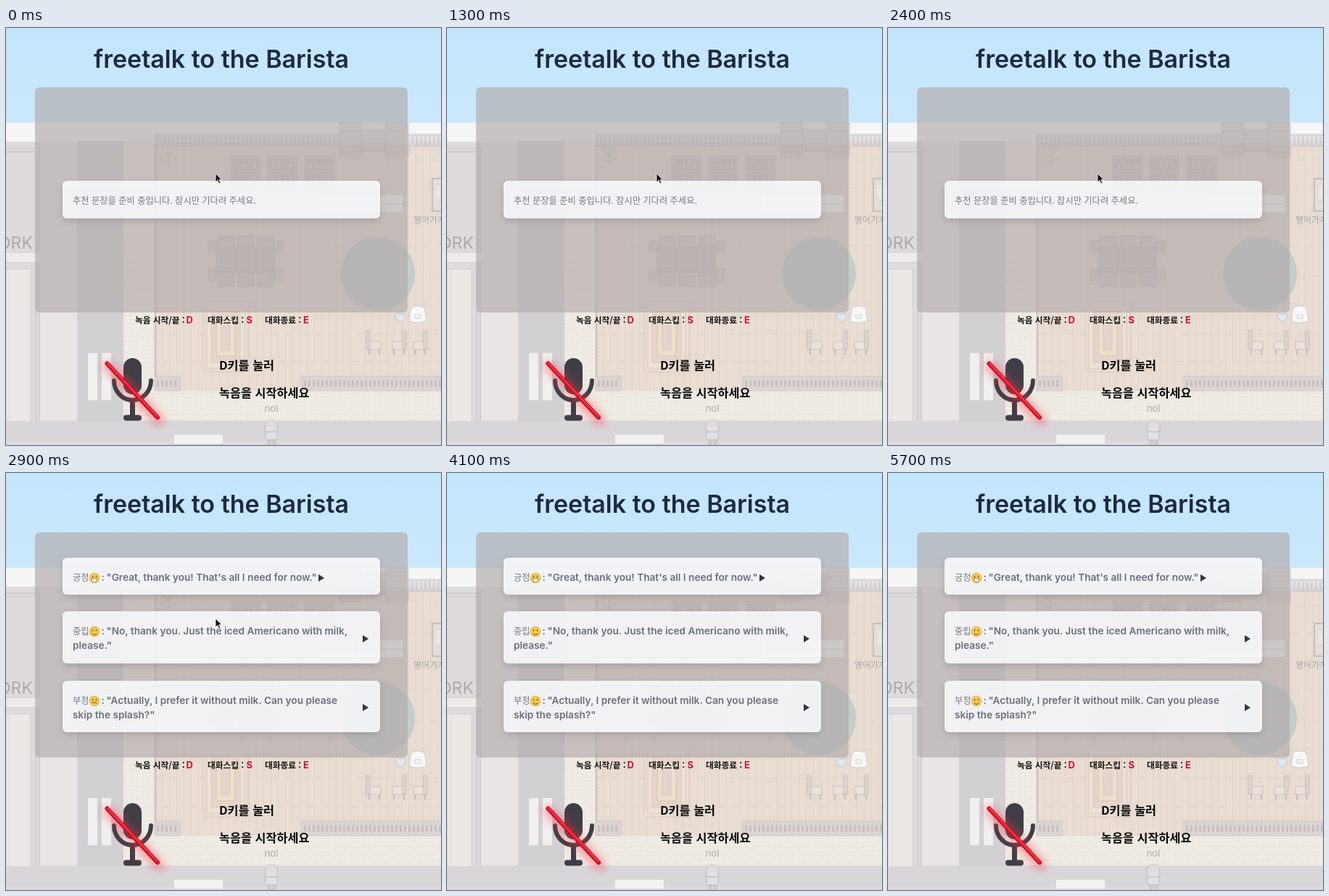
An HTML page that plays this animation: 600x576 px, repeating every 5800 ms.

```html
<!DOCTYPE html>
<html lang="ko">
<head>
<meta charset="utf-8">
<title>Free talk</title>
<style>
html, body { margin: 0; width: 100%; height: 100%; overflow: hidden; background: #eee; }
svg { display: block; width: 600px; height: 576px; }
text { font-family: Inter, "Noto Sans CJK KR", "Noto Sans CJK JP", "Noto Sans CJK", sans-serif; }
.ko { font-family: "Noto Sans CJK KR", "Noto Sans CJK JP", "Noto Sans CJK", sans-serif; }
.title { font-size: 34px; font-weight: 600; fill: #1f2a3d; }
.line { font-size: 13.65px; font-weight: 600; fill: #69707d; }
.soft { font-size: 12.25px; fill: #747982; }
.hint { font-size: 11.7px; font-weight: 700; fill: #111; }
.key { font-size: 13px; fill: #cf1232; }
.guide { font-size: 16.3px; font-weight: 800; fill: #080808; }
.card { fill: #fcfdff; fill-opacity: .85; filter: url(#shade); }
.faint { opacity: .5; }
</style>
</head>
<body>
<svg viewBox="0 0 600 576" xmlns="http://www.w3.org/2000/svg">
  <defs>
    <linearGradient id="sky" x2="0" y2="1">
      <stop stop-color="#c3e5fc"/><stop offset="1" stop-color="#cae8fc"/>
    </linearGradient>
    <linearGradient id="micTone" x2="0" y2="1">
      <stop stop-color="#403d46"/><stop offset="1" stop-color="#453d46"/>
    </linearGradient>
    <pattern id="planks" width="20" height="80" patternUnits="userSpaceOnUse" x="205">
      <rect width="20" height="80" fill="#e8dcd3"/>
      <path d="M.5 0V80M10.5 0V80" stroke="#e2d5cb"/>
      <path d="M0 22h10M10 61h10" stroke="#e0d3c9"/>
    </pattern>
    <pattern id="bricks" width="16" height="12" patternUnits="userSpaceOnUse">
      <rect width="16" height="12" fill="#f0ebe4"/>
      <path d="M0 .5h16M0 6.5h16M4.5 0v6M12.5 6v6" stroke="#ebe5dd"/>
    </pattern>
    <pattern id="rail" width="6" height="18" patternUnits="userSpaceOnUse" x="205" y="146">
      <rect width="6" height="18" fill="#d3d0d2"/>
      <path d="M1.5 4v11" stroke="#aaa7ad" stroke-width="2"/>
      <path d="M0 2h6M0 16.5h6" stroke="#bab7bc" stroke-width="2"/>
    </pattern>
    <filter id="shade" x="-10%" y="-30%" width="120%" height="180%">
      <feDropShadow dx="0" dy="4" stdDeviation="4" flood-color="#514a50" flood-opacity=".25"/>
    </filter>
    <filter id="glow" x="-50%" y="-50%" width="200%" height="200%">
      <feGaussianBlur stdDeviation="6"/>
    </filter>
  </defs>

  <g id="scene">
    <rect width="600" height="576" fill="#e9e5e4"/>
    <rect width="600" height="131" fill="url(#sky)"/>
    <rect y="131" width="600" height="26" fill="#f6f5f5"/>

    <!-- street and left building -->
    <rect x="98" y="156" width="64" height="420" fill="#d3d0d3"/>
    <rect y="157" width="47" height="419" fill="#dfdadb"/>
    <path d="M0 166H46V576M0 171H41V576" fill="none" stroke="#cfcacc" stroke-width="1.5"/>
    <rect y="310" width="47" height="14" fill="#eeebea"/>
    <path d="M0 310H47M0 324H47" stroke="#d0cbcd"/>
    <rect y="333" width="34" height="232" fill="#ece8e6" stroke="#d3cdcf"/>
    <path d="M5 333V565" stroke="#dcd6d7"/>
    <text x="-11" y="305" font-size="23" fill="#aca8ab">ORK</text>
    <path d="M113 449h13v65h-13zM132 449h13v65h-13z" fill="#f1eff0"/>
    <rect x="162" y="156" width="44" height="388" fill="url(#bricks)"/>

    <!-- room -->
    <rect x="205" y="163" width="395" height="338" fill="url(#planks)"/>
    <rect x="205" y="502" width="395" height="42" fill="url(#bricks)"/>
    <g class="faint">
      <rect x="205" y="146" width="395" height="18" fill="url(#rail)"/>
      <path d="M206 146V500" stroke="#b8b2b6" stroke-width="3"/>
      <path d="M205 481h35v20h-35zM408 481h192v20H408z" fill="#d4d0d3" stroke="#b6b2b8"/>
      <path d="M208 491h30M411 491h189" stroke="#aaa6ae" stroke-width="9" stroke-dasharray="3 3"/>

      <g fill="#c9c2c3" stroke="#aaa4aa">
        <path d="M460 131h30v47h-30zM490 140h33v30h-33zM523 131h32v47h-32z"/>
        <path d="M460 143h30M490 152h33M523 143h32M460 164h30M523 164h32" fill="none"/>
      </g>
      <path d="M224 190v-18m0 7l-9-12m9 12l9-13m-9 20l-11-5m11 5l11-7m-16-17l5 7 7-8"
        fill="none" stroke="#b3c0a9" stroke-width="2"/>
      <g id="shelves"></g>
      <g id="desk"></g>

      <!-- rug -->
      <g fill="#eadfd3" stroke="#d2b9b5">
        <rect x="272" y="378" width="62" height="97"/>
        <rect x="277" y="383" width="52" height="87" fill="#f0e8d9"/>
        <rect x="283" y="391" width="40" height="71" fill="#e4cfc9"/>
        <rect x="290" y="400" width="26" height="53" fill="#eee4ca" stroke="#d9c69f" stroke-width="2"/>
        <rect x="297" y="408" width="12" height="37" fill="#e2cdc8"/>
      </g>
      <g id="chairs"></g>
      <rect x="588" y="208" width="20" height="45" fill="#e8e1dc" stroke="#a8a2a5" stroke-width="2"/>
      <path d="M594 216h6v22h-6" fill="#f5f2ef" stroke="#c0b9b8"/>
    </g>

    <g fill="#fff" stroke="#d6d0d1">
      <path d="M433 230h50v25h-50zM483 230h65v25h-65z"/>
      <path d="M433 243h115M510 230v13" fill="none"/>
    </g>
    <text class="ko" x="562" y="270" font-size="12" font-weight="500" fill="#aaa6a7">영어가게</text>
    <circle cx="513" cy="339" r="51" fill="#c3cdc9"/>
    <path d="M537 396q3-5 7 0q4-4 7 0q0 6-7 11q-7-5-7-11" fill="#dfe8ee" stroke="#c1c7ce"/>
    <path d="M558 391q0-7 10-7t10 7l2 14q-12 4-24 0z" fill="#f8f7f7" stroke="#d3ced0"/>
    <path d="M564 396h8v5h-8z" fill="none" stroke="#cfccd0"/>

    <!-- road and figure -->
    <rect y="543" width="600" height="33" fill="#d9d6da"/>
    <path d="M47 543H600" stroke="#d3d0d4"/>
    <rect y="571" width="600" height="5" fill="#dddadd"/>
    <rect x="232" y="562" width="67" height="12" fill="#f3f2f3"/>
    <g class="faint" stroke="#aaa6aa">
      <path d="M357 552q0-11 9-11t9 11v5h-18z" fill="#e4e2e5"/>
      <path d="M360 551h12v6h-12z" fill="#f6ebe4" stroke="none"/>
      <path d="M358 558h16v11h-16z" fill="#e6eef2"/>
      <path d="M361 569h4v6h-4zM368 569h4v6h-4z" fill="#c6c4c9"/>
    </g>
    <text x="366" y="530" text-anchor="middle" font-size="13" font-weight="500" fill="#b9b4b1">nol</text>
  </g>

  <rect x="40" y="82" width="514" height="311" rx="6" fill="#b1a9aa" fill-opacity=".64"/>
  <text class="title" x="121" y="55">freetalk to the Barista</text>

  <g id="waiting">
    <rect class="card" x="78" y="211" width="438" height="52" rx="6"/>
    <text class="soft ko" x="92" y="243">추천 문장을 준비 중입니다. 잠시만 기다려 주세요.</text>
  </g>
  <g id="choices"></g>

  <text class="hint ko" x="178" y="408">녹음 시작/끝 :</text><text class="hint key" x="248.500" y="408">D</text>
  <text class="hint ko" x="278" y="408">대화스킵 :</text><text class="hint key" x="331.500" y="408">S</text>
  <text class="hint ko" x="357" y="408">대화종료 :</text><text class="hint key" x="410" y="408">E</text>
  <text class="guide ko" x="294" y="472">D키를 눌러</text>
  <text class="guide ko" x="294" y="510">녹음을 시작하세요</text>

  <!-- muted microphone -->
  <g fill="none" stroke-linecap="round">
    <rect x="162" y="456" width="25" height="50" rx="12.5" fill="url(#micTone)"/>
    <path d="M149 487a25.5 27 0 0 0 51 0" stroke="#413d46" stroke-width="6"/>
    <path d="M174.500 515V537" stroke="#413d46" stroke-width="7"/>
    <path d="M166 538.500H183" stroke="#413d46" stroke-width="8"/>
    <path d="M141 467L211 542" stroke="#ff3446" stroke-width="15" opacity=".42" filter="url(#glow)"/>
    <path d="M139.500 463.500L209 538" stroke="#b30d20" stroke-width="6"/>
    <path d="M139.500 463L209 537.500" stroke="#ea1c2f" stroke-width="4"/>
    <path d="M140.500 463L208 535.500" stroke="#ff5964" stroke-width="1"/>
  </g>

  <path id="pointer" d="M289 201v12l2.800-2.600 2 4.600 2-.9-2-4.500h3.700z" fill="#111" stroke="#f4f4f4" stroke-width=".8"/>
</svg>

<script>
const LOOP = 5800, REPLY_AT = 2700, POINTER_OFF = 3300;
const $ = id => document.getElementById(id);
const box = (x, y, w, h, fill, line) =>
  `<rect x="${x}" y="${y}" width="${w}" height="${h}" fill="${fill}" stroke="${line}"/>`;

// Shelves: three units with two rows of jars
$('shelves').innerHTML = [310, 360, 412].map(x => {
  let s = box(x, 177, 41, 47, '#d0c7c4', '#a59fa4');
  for (let row = 0; row < 2; row++) {
    s += box(x + 3, 181 + row * 19, 35, 15, '#bdb5b5', '#aaa3a7');
    for (let i = 0; i < 4; i++)
      s += box(x + 6 + i * 8, 186 + row * 19, 5, 8, i % 2 ? '#d9d2ce' : '#cbc8cd', '#9f9aa0');
  }
  return s + `<path d="M${x} 219h41" stroke="#a59fa4"/>`;
}).join('');

// Long table with seats on every side
let desk = '';
for (const x of [293, 320, 347])
  for (const y of [287, 336]) desk += box(x, y, 22, 21, '#c1bfc6', '#a39ea6');
for (const x of [279, 370])
  for (const y of [294, 333]) desk += box(x, y, 12, 16, '#c8c0be', '#a7a0a3');
desk += box(290, 303, 80, 34, '#b8b3b7', '#9b969e') +
  '<path d="M290 330h80M317 303v34M344 303v34" stroke="#a39ea5"/>';
$('desk').innerHTML = desk;

$('chairs').innerHTML = [497, 531, 560].map((x, i) => {
  const back = i === 0 ? x : x + 16;
  return box(x + 2, 433, 18, 11, '#eee9e5', '#b2abae') +
    box(back, 418, 5, 26, '#d9d0ca', '#aaa3a7') +
    `<path d="M${x + 4} 444v7M${x + 18} 444v7" stroke="#a8a1a5" stroke-width="2"/>`;
}).join('');

const face = (y, mouth) => `<circle cx="122" cy="${y}" r="7" fill="#f2c84f" stroke="#dda94a" stroke-width=".7"/>
  <path d="M119.500 ${y - 3}v2.500M124.500 ${y - 3}v2.500" stroke="#72562e" stroke-width="1.300"/>${mouth}`;
const curve = (y, bend, id = '') =>
  `<path ${id} d="M118.500 ${y + 3}q3.500 ${bend} 7 0" fill="none" stroke="#72562e"/>`;

const replies = [
  { top: 117, h: 51, tag: '긍정', lines: ['"Great, thank you! That\'s all I need for now."'], arrow: [431, 145],
    mouth: y => `<path d="M118 ${y + 1}h8q-1 5-4 5t-4-5" fill="#fff" stroke="#8a6632" stroke-width=".7"/>` },
  { top: 191, h: 72, tag: '중립', lines: ['"No, thank you. Just the iced Americano with milk,', 'please."'], arrow: [492, 229],
    mouth: y => curve(y, 3) },
  { top: 287, h: 71, tag: '부정', lines: ['"Actually, I prefer it without milk. Can you please', 'skip the splash?"'], arrow: [492, 324],
    mouth: y => curve(y, -3, 'id="frown"') + curve(y, 3, 'id="smile"') }
];

$('choices').innerHTML = replies.map(({ top, h, tag, lines, arrow: [ax, ay], mouth }) => {
  const base = top + 32;
  return `<rect class="card" x="78" y="${top}" width="438" height="${h}" rx="6"/>
    <text class="soft ko" x="92" y="${base}">${tag}</text>${face(base - 4, mouth(base - 4))}
    <text class="line" x="131.500" y="${base}">:</text>
    <text class="line" x="138.500" y="${base}">${lines[0]}</text>
    <text class="line" x="92" y="${base + 20}">${lines[1] || ''}</text>
    <path d="M${ax} ${ay - 5}l8 5-8 5z" fill="#35363b"/>`;
}).join('');

const show = (id, on) => $(id).setAttribute('visibility', on ? 'inherit' : 'hidden');

function draw() {
  const t = performance.now() % LOOP;
  const replied = t >= REPLY_AT, late = t >= POINTER_OFF;
  show('waiting', !replied);
  show('choices', replied);
  show('pointer', !late);
  show('frown', replied && !late);
  show('smile', late);
  requestAnimationFrame(draw);
}
draw();
</script>
</body>
</html>
```
